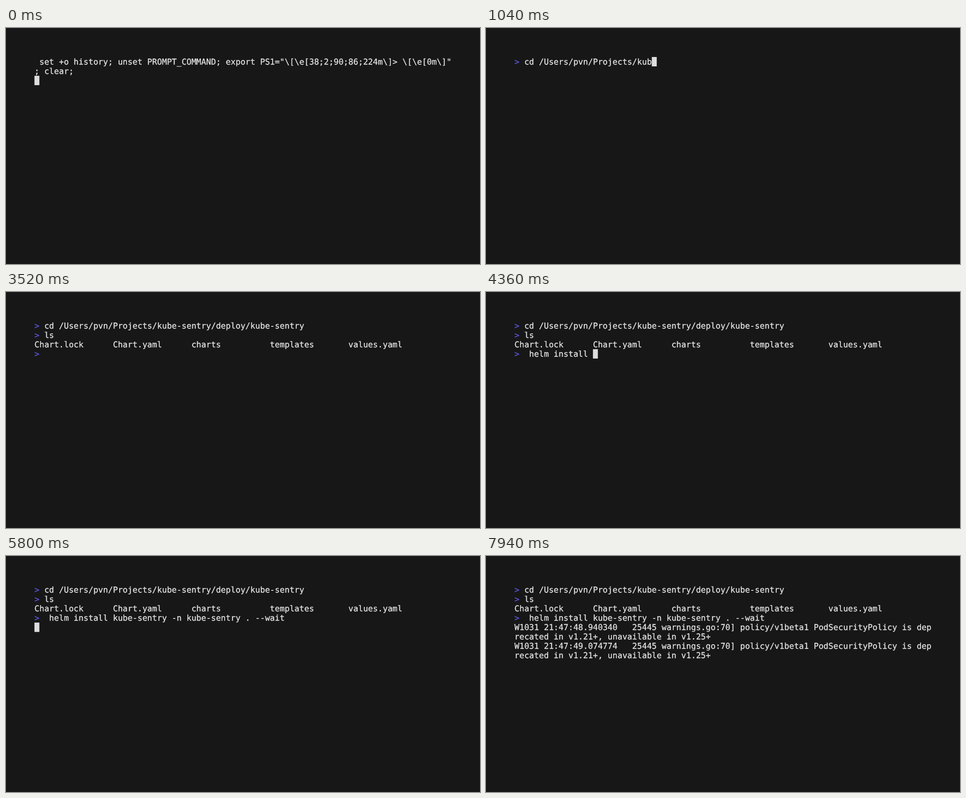
An HTML page for the animation above (8 s loop, 1058x529 px).

```html
<!DOCTYPE html>
<html lang="en">
<head>
<meta charset="utf-8">
<title>Terminal</title>
<style>
  html, body { margin: 0; width: 100%; height: 100%; overflow: hidden; background: #171717; }
  #term {
    position: absolute; left: 0; top: 0;
    font: 18.19px/21.06px "DejaVu Sans Mono", "Noto Sans Mono", monospace;
    font-kerning: none; font-variant-ligatures: none;
    text-rendering: geometricPrecision;
    -webkit-text-stroke: 0.35px currentColor;
    color: #e2e2e2;
  }
  .row { position: absolute; white-space: pre; }
  .prompt { color: #5a56e0; }
  #cursor { position: absolute; left: 0; top: 0; width: 11px; height: 21px; background: #dddddd; }
</style>
</head>
<body>
<div id="term"><div id="cursor"></div></div>
<script>
const LOOP = 8000, COLS = 85, KEY = 40;
const LEFT = 63.5, TOP = 65, CELL_W = 10.95, CELL_H = 21.06, TEXT_DROP = 1;
const term = document.getElementById("term");
const cursor = document.getElementById("cursor");

const setup = ' set +o history; unset PROMPT_COMMAND; export PS1="\\[\\e[38;2;90;86;224m\\]> \\[\\e[0m\\]"; clear;';
const cd = "> cd /Users/pvn/Projects/kube-sentry/deploy/kube-sentry";
const files = ["Chart.lock", "Chart.yaml", "charts", "templates", "values.yaml"]
  .map(name => name.padEnd(16)).join("").trimEnd();
const helm = ">  helm install kube-sentry -n kube-sentry . --wait";
const warning = time => "W1031 " + time +
  "   25445 warnings.go:70] policy/v1beta1 PodSecurityPolicy is deprecated in v1.21+, unavailable in v1.25+";

const wrap = text => text.match(new RegExp(`.{1,${COLS}}`, "g"));

// Each step: start time, rows of text, cursor visibility; the cursor ends the last row.
const steps = [];
const show = (at, lines, on = true) => steps.push({ at, lines, on });
const blink = (lines, ...times) => times.forEach((at, i) => show(at, lines, i % 2 === 1));

// Types a line after its prompt; `late` maps a column to its delay.
function type(before, line, start, late = {}) {
  for (let col = 3; col <= line.length; col++) {
    show(start + (col - 3) * KEY + (late[col] || 0), [...before, line.slice(0, col)]);
  }
}

const typed = wrap(setup);
show(0, [...typed, ""]);
show(40, [...typed, ...wrap("> " + setup), ""]);

type([], cd, 40, { 3: 20, 24: 20, 29: 20, 45: 20, 49: 20 });
show(2160, [cd, ""]);
show(2180, [cd, "> "]);
blink([cd, "> "], 2640);

type([cd], "> ls", 2960);
show(3040, [cd, "> ls", ""]);
const listed = [cd, "> ls", files];
show(3060, [...listed, "> "]);
blink([...listed, "> "], 3520);

type(listed, helm, 3840, { 45: 20 });
const waiting = [...listed, helm];
show(5800, [...waiting, ""]);
blink([...waiting, ""], 6140, 6440);

const first = [...waiting, ...wrap(warning("21:47:48.940340"))];
const second = [...first, ...wrap(warning("21:47:49.074774")), ""];
show(6660, [...first, ""]);
show(6760, second);
blink(second, 7160, 7540, 7940);

const rows = Array.from({ length: 9 }, (_, i) => {
  const row = document.createElement("div");
  const prompt = document.createElement("span");
  const text = document.createElement("span");
  row.className = "row";
  prompt.className = "prompt";
  row.style.left = LEFT + "px";
  row.style.top = TOP + TEXT_DROP + i * CELL_H + "px";
  row.append(prompt, text);
  term.append(row);
  return { prompt, text };
});

function draw({ lines, on }) {
  rows.forEach(({ prompt, text }, i) => {
    const line = lines[i] || "";
    const cut = line.startsWith("> ") ? 2 : 0;
    prompt.textContent = line.slice(0, cut);
    text.textContent = line.slice(cut);
  });
  const last = lines.length - 1;
  const x = LEFT + lines[last].length * CELL_W;
  const y = TOP + last * CELL_H;
  cursor.style.transform = `translate(${x}px, ${y}px)`;
  cursor.style.visibility = on ? "visible" : "hidden";
}

let current = null;
function tick() {
  const time = performance.now() % LOOP;
  const step = steps.findLast(s => s.at <= time);
  if (step !== current) draw(current = step);
  requestAnimationFrame(tick);
}
tick();
</script>
</body>
</html>
```
